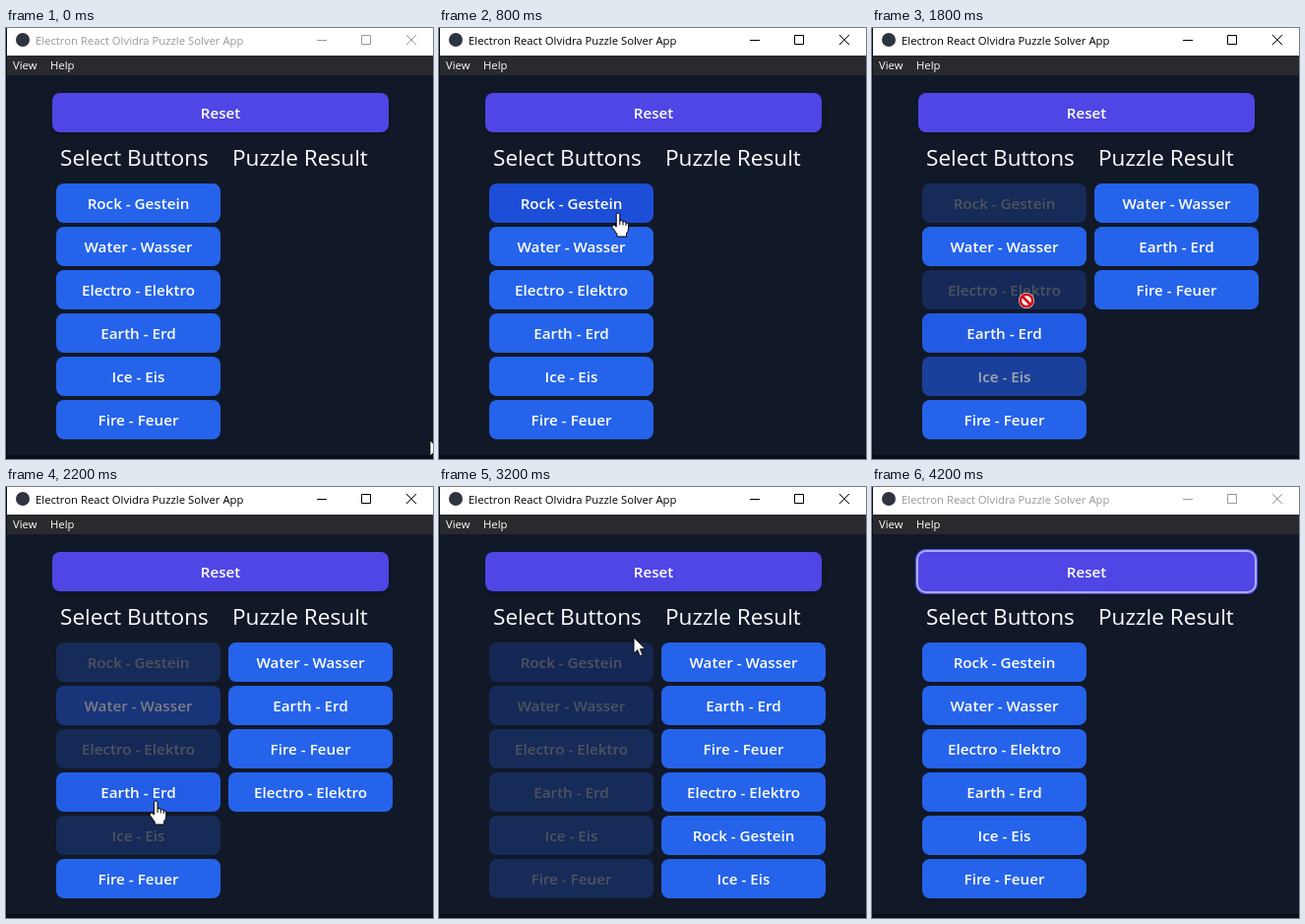
Recreate the animation shown at these times as an HTML page. Size 434 by 438 pixels, loop 4.3 s.

```html
<!DOCTYPE html>
<html lang="en">
<head>
<meta charset="utf-8">
<style>
html, body { margin: 0; width: 100%; height: 100%; overflow: hidden; background: #111827; }
body { position: relative; font: 11.3px "Open Sans", sans-serif; color: #fff; cursor: default; }
body > * { position: absolute; white-space: nowrap; box-sizing: border-box; }
#bar { left: 0; top: 0; width: 434px; height: 28px; background: #fff; }
#bar span { position: absolute; left: 30px; top: 0; line-height: 26px; }
#bar svg { position: absolute; left: 0; top: 0; }
#menu { left: 0; top: 28px; width: 434px; height: 20px; background: #292a2d; line-height: 20px; }
#menu span { position: absolute; left: 7px; }
#menu span + span { left: 45px; }
#edge { left: 0; top: 0; width: 434px; height: 438px; border: solid #0a0d1a; border-width: 0 0 4px 1px; }
h1 { margin: 0; top: 112px; font-size: 22.6px; font-weight: 400; line-height: 40px; }
.btn { width: 167px; height: 40px; border-radius: 8px; background: #2563eb; font-size: 15.2px;
  font-weight: 600; line-height: 40px; text-align: center; }
#cursor { left: 0; top: 0; }
</style>
</head>
<body>
<div id="bar">
  <svg width="434" height="28" fill="none" stroke="currentColor">
    <circle cx="17" cy="12" r="7" fill="#2f3441" stroke="none"/>
    <path d="M316 12.5h10M361.5 7.5h9v9h-9zM407 7l10 10M417 7l-10 10"/>
  </svg>
  <span>Electron React Olvidra Puzzle Solver App</span>
</div>
<div id="menu"><span>View</span><span>Help</span></div>
<div id="edge"></div>
<h1 style="left:55px">Select Buttons</h1>
<h1 style="left:230px">Puzzle Result</h1>
<svg id="cursor" width="434" height="438">
  <g id="pointer">
    <path id="arrow" fill="#fff" stroke="#000" stroke-width=".8" d="M0 0v16l3.7-3.5 2.5 6 2.6-1.1-2.5-5.9h5.2z"/>
    <path id="hand" fill="#fff" stroke="#000" stroke-linejoin="round"
      d="M-1.8 1.5Q-1.8 0 0 0T1.8 1.5V8Q4.5 6.5 5 9Q7.5 7.5 8 10Q10.500 9 10.500 12V16Q10.500 19 8.500 20.500V24H-1V21.500L-6 14.500Q-6.500 11.500-4 12L-1.800 14ZM1.800 8v4M5 9v3.500M8 10v3"/>
    <g id="denied">
      <circle r="8" fill="#fff"/>
      <circle r="6.2" fill="#fff" stroke="#d3131b" stroke-width="2.8"/>
      <path d="M-4.500-4.500L4.500 4.500" stroke="#d3131b" stroke-width="2.800"/>
    </g>
  </g>
</svg>
<script>
const LOOP = 4300, STEP = 100, FADE = 200, HOVER = 150, RESET_AT = 3660;
const $ = id => document.getElementById(id);
const clamp = v => Math.max(0, Math.min(1, v));
const mix = (a, b, k) => `rgb(${a.map((v, i) => Math.round(v + (b[i] - v) * k))})`;
const BLUE = [37, 99, 235], DARK_BLUE = [29, 78, 216];
const INDIGO = [79, 70, 229], DARK_INDIGO = [67, 56, 202];

const labels = ["Rock - Gestein", "Water - Wasser", "Electro - Elektro", "Earth - Erd", "Ice - Eis", "Fire - Feuer"];
const clickedAt = [920, 2050, 1380, 2680, 1700, 2360];
const clickOrder = [0, 2, 4, 1, 5, 3];
const resultOrder = [1, 3, 5, 2, 0, 4];

// Mouse path: time, x, y
const path = [
  [0, 431, 419], [600, 182, 189], [1000, 182, 187], [1300, 155, 262], [1400, 155, 264],
  [1600, 150, 350], [1700, 152, 350], [1800, 157, 277], [1950, 155, 224], [2100, 155, 224],
  [2280, 150, 395], [2400, 150, 395], [2600, 153, 316], [2800, 153, 316], [3350, 215, 92],
  [RESET_AT, 222, 95], [3700, 228, 163], [4000, 290, 442], [LOOP, 290, 460]
];

function mouse(t) {
  const i = Math.max(1, path.findIndex(p => p[0] >= t));
  const [t0, x0, y0] = path[i - 1], [t1, x1, y1] = path[i];
  const k = clamp((t - t0) / (t1 - t0));
  return [x0 + (x1 - x0) * k, y0 + (y1 - y0) * k];
}

function addButton(text, x, y) {
  const el = document.createElement("div");
  el.className = "btn";
  el.textContent = text;
  el.style.left = x + "px";
  el.style.top = y + "px";
  document.body.insertBefore(el, $("cursor"));
  return { el, x, y, w: 167 };
}

const reset = addButton("Reset", 47, 66);
reset.w = 342;
reset.el.style.width = "342px";
const choices = labels.map((s, i) => addButton(s, 51, 158 + 44 * i));
const results = resultOrder.map((n, i) => addButton(labels[n], 226, 158 + 44 * i));

function isOver(b, t) {
  const [x, y] = mouse(t);
  return x >= b.x && x < b.x + b.w && y >= b.y && y < b.y + 40;
}

// Share of the last HOVER ms spent over the button
function hover(b, t) {
  let n = 0;
  for (let k = 0; k < 15; k++) n += isOver(b, t - k * HOVER / 15);
  return n / 15;
}

function draw(t) {
  const cleared = t >= RESET_AT;
  const restored = clamp((t - RESET_AT) / FADE);
  const disabled = i => t >= clickedAt[i] && !cleared;

  $("bar").style.color = t >= 700 && t < 4100 ? "#000" : "#999";

  choices.forEach((b, i) => {
    const faded = clamp((t - clickedAt[i]) / FADE) * (1 - restored);
    b.el.style.opacity = 1 - 0.75 * faded;
    b.el.style.background = mix(BLUE, DARK_BLUE, hover(b, t));
  });
  results.forEach((b, i) => {
    b.el.style.visibility = t >= clickedAt[clickOrder[i]] && !cleared ? "visible" : "hidden";
  });

  reset.el.style.background = mix(INDIGO, DARK_INDIGO, hover(reset, t));
  const ring = clamp((t - RESET_AT) / 80);
  reset.el.style.boxShadow = cleared
    ? `0 0 0 ${2 * ring}px #a9acf5, 0 0 0 ${3 * ring}px #4f46e5`
    : "0 3px 5px -1px #0003";

  const over = choices.findIndex(b => isOver(b, t));
  const kind = over >= 0 ? (disabled(over) ? "denied" : "hand")
    : [reset, ...results].some(b => b.el.style.visibility !== "hidden" && isOver(b, t)) ? "hand" : "arrow";
  for (const id of ["arrow", "hand", "denied"]) $(id).style.display = id === kind ? "" : "none";
  $("pointer").setAttribute("transform", `translate(${mouse(t)})`);
}

const start = performance.now();
function tick() {
  const t = (performance.now() - start) % LOOP;
  draw(Math.floor(t / STEP) * STEP);
  requestAnimationFrame(tick);
}
tick();
</script>
</body>
</html>
```
